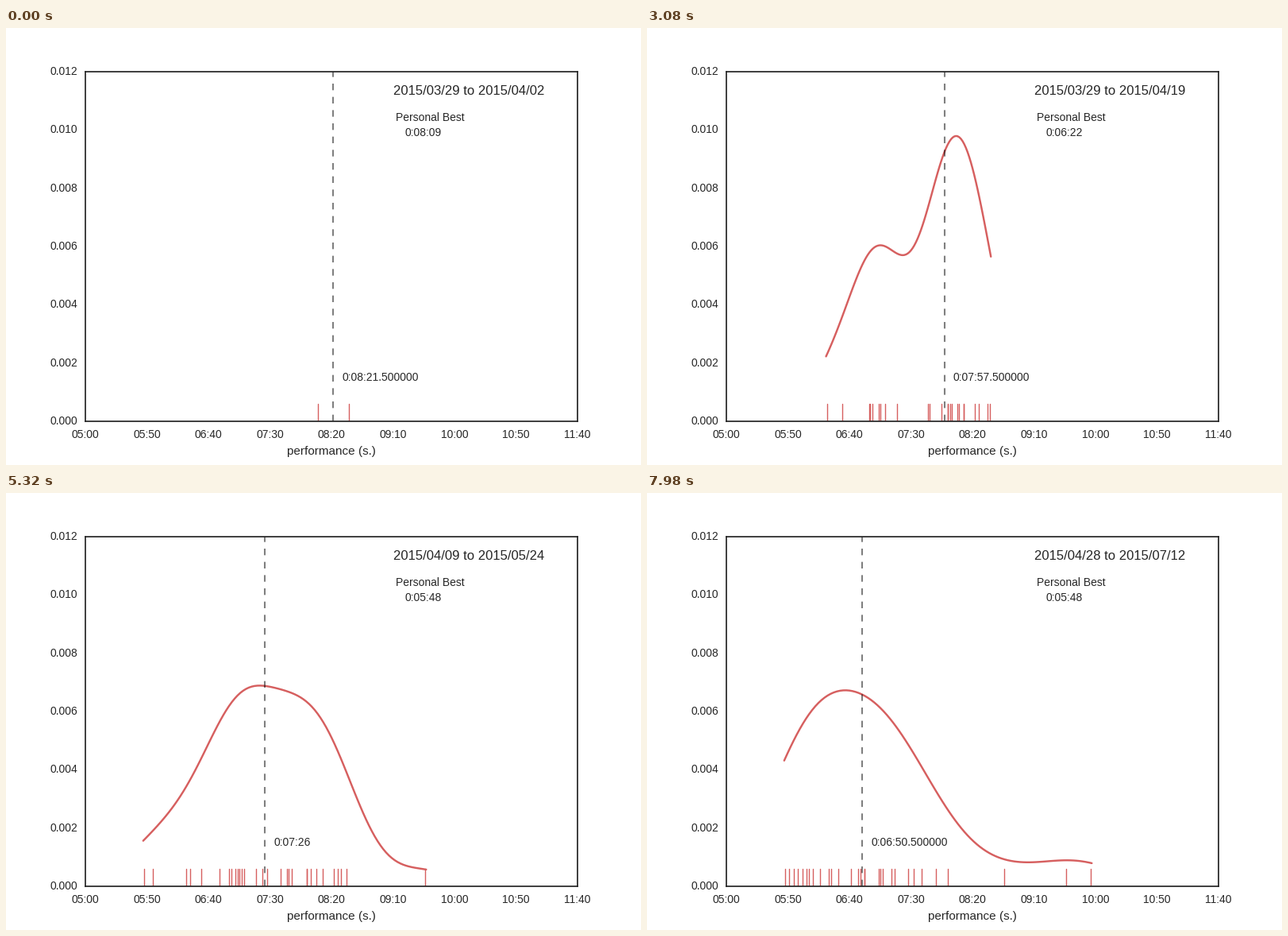
A matplotlib script that plays this animation: 800x550 px, repeating every 8 s.

```python
import numpy as np
import matplotlib.pyplot as plt
from matplotlib.animation import FuncAnimation
from matplotlib.ticker import FuncFormatter

INTERVAL, FRAMES = 40, 200
STEP = 140      # ms for which each new run is shown
WINDOW = 30     # runs kept in the rolling view
INK, RED = "0.15", "#d65f5f"

# Run times in seconds, in the order they were recorded.
RUNS = np.array([
    489, 514, 512, 482, 475, 480, 425, 424, 416, 493,
    417, 488, 464, 483, 439, 465, 419, 394, 480, 429,
    502, 505, 382, 493, 468, 512, 422, 508, 444, 385,
    425, 480, 448, 409, 459, 427, 576, 355, 424, 348,
    391, 434, 370, 401, 470, 362, 376, 596, 367, 412,
    358, 365, 407, 526, 383, 351, 437, 452, 412,
])
# Days since the first run, interpolated between a few known dates.
DAYS = np.interp(
    np.arange(len(RUNS)),
    [0, 1, 8, 10, 16, 21, 29, 39, 50, 58],
    [0, 4, 11, 11, 17, 18, 30, 56, 84, 105],
).round().astype(int)

plt.rcParams.update({
    "font.family": "Liberation Sans",
    "font.size": 10,
    "text.color": INK,
    "axes.edgecolor": INK,
    "axes.linewidth": 1.25,
    "xtick.color": INK,
    "ytick.color": INK,
    "lines.solid_capstyle": "round",
    "lines.scale_dashes": False,
})


def date(i):
    day = np.datetime64("2015-03-29") + np.timedelta64(int(DAYS[i]), "D")
    return str(day).replace("-", "/")


def clock(sec):
    whole = int(sec)
    text = f"{whole // 3600}:{whole // 60 % 60:02d}:{whole % 60:02d}"
    return text + (f".{round((sec - whole) * 1e6):06d}" if sec != whole else "")


def density(runs, x):
    """Gaussian kernel density with Scott's bandwidth."""
    bw = runs.std(ddof=1) * len(runs) ** -0.2
    z = (x[:, None] - runs) / bw
    return np.exp(-z ** 2 / 2).mean(axis=1) / (bw * np.sqrt(2 * np.pi))


fig = plt.figure(figsize=(8, 5.5), dpi=100, facecolor="white")
ax = fig.add_axes([0.125, 0.1, 0.775, 0.8])
ax.set(xlim=(300, 700), ylim=(0, 0.012),
       xticks=np.arange(300, 701, 50), yticks=np.arange(7) * 0.002)
ax.xaxis.set_major_formatter(
    FuncFormatter(lambda s, _: f"{int(s) // 60:02d}:{int(s) % 60:02d}"))
ax.yaxis.set_major_formatter(FuncFormatter(lambda v, _: f"{v:.3f}"))
ax.tick_params(length=0, pad=7)
for label in ax.get_yticklabels():
    label.set_va("center")
fig.text(410 / 800, 13 / 550, "performance (s.)", size=11, ha="center")

curve, = ax.plot([], [], color=RED, lw=1.75)
rug, = ax.plot([], [], color=RED, lw=1, transform=ax.get_xaxis_transform())
middle = ax.axvline(500, color="k", alpha=0.5, lw=1.5, ls=(0, (6, 6)))
middle_text = ax.text(500, 0.0014, "")
span_text = ax.text(550, 0.0112, "", size=12)
ax.text(552.3, 0.01031, "Personal Best")
best_text = ax.text(559.8, 0.00979, "")


def update(frame):
    n = (frame * INTERVAL + INTERVAL // 2) // STEP
    last = n + 1
    first = max(0, last + 1 - WINDOW)
    runs = RUNS[first:last + 1]

    x = np.linspace(runs.min() - 1, runs.max() + 1, 100)
    curve.set_data(x, density(runs, x))
    rug.set_data(np.repeat(runs, 3), np.tile([0, 0.05, np.nan], len(runs)))

    med = float(np.median(runs))
    middle.set_xdata([med, med])
    middle_text.set_x(med + 7)
    middle_text.set_text(clock(med))
    span_text.set_text(f"{date(first)} to {date(last)}")
    best_text.set_text(clock(RUNS[:last + 1].min()))
    return curve, rug, middle, middle_text, span_text, best_text


anim = FuncAnimation(fig, update, frames=FRAMES, interval=INTERVAL,
                     repeat=True, repeat_delay=0)
plt.show()
```
